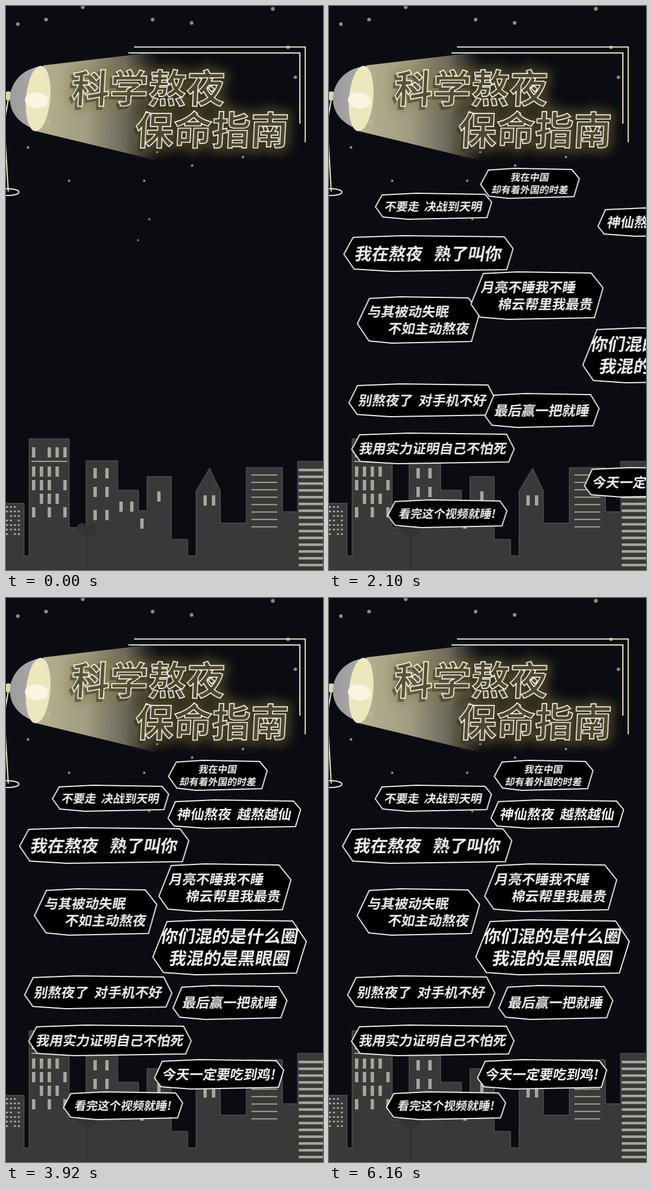
Recreate the animation shown at these times as an HTML page. Size 562 px wide and 997 px high, loop 6300 ms.

```html
<!DOCTYPE html>
<html lang="zh">
<head>
<meta charset="utf-8">
<style>
html, body { margin: 0; width: 100%; height: 100%; overflow: hidden; background: #0b0c12; }
svg { display: block; width: 100%; height: 100%; }
text { font-family: "Noto Sans CJK SC", "Noto Sans CJK", sans-serif; font-weight: 700; white-space: pre; }
.title { font-size: 68px; }
.pill polygon { fill: #000; stroke: #f0f0f0; stroke-width: 2; }
.pill text { fill: #eee; text-anchor: middle; }
</style>
</head>
<body>
<svg id="stage" viewBox="0 0 562 997">
  <defs>
    <linearGradient id="beam" gradientUnits="userSpaceOnUse" x1="60" y1="0" x2="272" y2="0">
      <stop offset="0" stop-color="#b7b18f"/>
      <stop offset=".4" stop-color="#a8a388" stop-opacity=".95"/>
      <stop offset=".72" stop-color="#8f8b75" stop-opacity=".72"/>
      <stop offset="1" stop-color="#6d6a5c" stop-opacity="0"/>
    </linearGradient>
    <linearGradient id="shade" x1="0" x2="1">
      <stop offset="0" stop-color="#9b9b9d"/><stop offset="1" stop-color="#acacac"/>
    </linearGradient>
    <filter id="glow" x="-20%" y="-40%" width="140%" height="180%"><feGaussianBlur stdDeviation="9"/></filter>
    <g id="title" class="title">
      <text transform="translate(115 171) skewX(-3)">科学熬夜</text>
      <text transform="translate(228 245) skewX(-3)">保命指南</text>
    </g>
  </defs>
  <rect width="562" height="997" fill="#0b0c12"/>
  <g id="stars" fill="#918b6c"></g>

  <path d="M0 879H32V972H41V765H112V922H142V804H198V856H235V892H250V832H293V943H322V972H337V857L361 817L380 857V914H426V816H490V894H517V805H563V998H-1V879Z" fill="#393939" stroke="#626262"/>
  <g fill="#333">
    <circle cx="134" cy="923" r="9"/>
    <path d="M145 940C128 931 131 917 139 917Q144 917 146 922Q151 913 158 917C167 922 162 932 145 940Z"/>
    <rect x="143" y="930" width="4" height="67"/>
  </g>
  <g id="windows" fill="#a5a59a"></g>

  <path d="M66 105L245 84H272V274L52 221Z" fill="url(#beam)"/>
  <g fill="none" stroke="#f3f0c6" stroke-width="2">
    <path d="M4 165L-3 206L4 328"/>
    <ellipse cx="4" cy="329" rx="19" ry="6"/>
    <path d="M227 72.5H530.5V241M217 83H521V208"/>
  </g>
  <circle cx="4" cy="159" r="8" fill="#dad5ac"/>
  <path d="M62 107C30 110 7 135 7 164C7 190 25 209 52 218Z" fill="url(#shade)"/>
  <ellipse cx="57" cy="163.500" rx="21.500" ry="58" transform="rotate(5 57 163)" fill="#ece7bd"/>
  <ellipse cx="54" cy="167" rx="20.500" ry="14" transform="rotate(5 54 167)" fill="#f8f6e1"/>
  <circle cx="75" cy="205" r="1.800" fill="#d2ccaa"/>

  <use href="#title" fill="#857838" stroke="#857838" stroke-width="18" stroke-linejoin="round" filter="url(#glow)" opacity=".45"/>
  <use href="#title" x="-4" y="5" fill="#302c1c" stroke="#302c1c" stroke-width="3" opacity=".5"/>
  <use href="#title" fill="#564e2a" fill-opacity=".75" stroke="#fff" stroke-width="1.700"/>
</svg>
<script>
const LOOP = 6300, STEP = 70, REST = 6090;
const SPEED = 0.463, BOUNCE = 250;
const stage = document.getElementById('stage');

function add(parent, tag, attrs, text) {
  const node = document.createElementNS('http://www.w3.org/2000/svg', tag);
  for (const key in attrs) node.setAttribute(key, attrs[key]);
  if (text) node.textContent = text;
  return parent.appendChild(node);
}

const repeat = (count, draw) => { for (let i = 0; i < count; i++) draw(i); };

// stars get smaller towards the horizon
const stars = document.getElementById('stars');
for (const [cx, cy] of [[21, 32], [71, 24], [136, 2], [260, 24], [329, 30], [473, 5], [500, 73], [513, 126],
  [268, 258], [330, 282], [420, 267], [112, 309], [245, 309], [39, 250], [254, 377], [234, 414]])
  add(stars, 'circle', { cx, cy, r: 3.4 - cy / 250 });

const windows = document.getElementById('windows');
const pane = (x, y, width, height) => add(windows, 'rect', { x, y, width, height });
const row = (y, ...centers) => centers.forEach(c => pane(c - 3, y, 6, 18));

['# ###', '#### ', '### #', ' ### ', '# # #'].forEach((mask, j) =>
  [...mask].forEach((mark, i) => { if (mark === '#') row(j ? 790 + j * 24 : 780, 49 + i * 13.9); }));
pane(45, 804, 64, 2);
for (const y of [817, 850, 891]) row(y, 158, 179);
row(876, 204, 223);
row(906, 241);
row(858, 271);
row(865, 353, 368);
repeat(8, i => pane(435, 828 + i * 13.1, 46, 2));
repeat(15, i => pane(519, 818 + i * 12, 43, 4.5));
repeat(7, i => repeat(4, j => { if ((i * 3 + j * 2) % 7 !== 6) pane(j * 7, 884 + i * 8, 3.5, 3); }));

// zero: moment a group first reaches its place; from: side it enters on
// pill: box [x, y, width, height], font size, lines, stagger between the lines
const groups = [
  {
    from: -1, zero: 1317, rest: 2, sway: 3, period: 440,
    pills: [
      { box: [83, 331, 206, 46], size: 20.5, lines: ['不要走  决战到天明'] },
      { box: [51, 514, 217, 82], size: 24, lines: ['与其被动失眠', '不如主动熬夜'], stagger: 36 },
      { box: [41, 755, 288, 54], size: 23.8, lines: ['我用实力证明自己不怕死'] }
    ]
  },
  {
    from: -1, zero: 1855, rest: -0.5, sway: 0.5, period: 440,
    pills: [
      { box: [25, 406, 300, 63], size: 30, lines: ['我在熬夜   熟了叫你'] },
      { box: [34, 668, 261, 58], size: 24, lines: ['别熬夜了  对手机不好'] },
      { box: [103, 873, 211, 49], size: 20.5, lines: ['看完这个视频就睡!'] }
    ]
  },
  {
    from: 1, zero: 1996, rest: 1, sway: 3, period: 385,
    pills: [
      { box: [289, 287, 175, 53], size: 17, lines: ['我在中国', '却有着外国的时差'] },
      { box: [272, 470, 234, 84], size: 24, lines: ['月亮不睡我不睡', '棉云帮里我最贵'], stagger: 30 },
      { box: [297, 685, 202, 60], size: 24, lines: ['最后赢一把就睡'] }
    ]
  },
  {
    from: 1, zero: 2506, rest: -1, sway: 0.8, period: 440,
    pills: [
      { box: [289, 357, 235, 50], size: 24, lines: ['神仙熬夜  越熬越仙'] },
      { box: [262, 569, 272, 97], size: 30.5, lines: ['你们混的是什么圈', '我混的是黑眼圈'] },
      { box: [265, 816, 229, 52], size: 24, lines: ['今天一定要吃到鸡!'] }
    ]
  }
];

// slide in at even speed, overshoot once, then sway until the end
function offsetAt({ from, zero, rest, sway, period }, time) {
  const age = time - zero;
  if (age < 0) return -from * SPEED * Math.max(age, -750);
  if (age < BOUNCE) return -from * 21 * Math.sin(Math.PI * age / BOUNCE);
  return rest + sway * Math.cos(2 * Math.PI * (Math.min(time, REST) - 4550) / period);
}

// a slab with cut corners, pointed on the left and right
function outline(x, y, w, h) {
  const left = 0.6 + 0.08 * Math.sin(w), right = 0.43 + 0.1 * Math.sin(y);
  return [
    [0, left * h], [0.26 * h, 3], [0.35 * w, 0], [w - 0.25 * h, 2],
    [w, right * h], [w - 0.18 * h, h - 3], [0.28 * w, h], [(1 - left) * 0.6 * h, h - 4]
  ].map(([dx, dy]) => [x + dx, y + dy]).join(' ');
}

function drawPill(group, { box, size, lines, stagger = 0 }) {
  const [x, y, w, h] = box;
  add(group, 'polygon', { points: outline(...box) });
  lines.forEach((line, i) => {
    const k = i - (lines.length - 1) / 2;
    const cx = x + w / 2 + k * stagger - size * 0.06;
    const baseline = y + h / 2 + k * size * 1.28 + size * 0.37;
    add(group, 'text', { 'font-size': size, transform: `translate(${cx} ${baseline}) skewX(-10)` }, line);
  });
}

for (const motion of groups) {
  const group = add(stage, 'g', { class: 'pill' });
  motion.pills.forEach(pill => drawPill(group, pill));
  const frames = [];
  for (let time = 0; time <= LOOP; time += STEP)
    frames.push({
      offset: time / LOOP,
      easing: 'step-end',
      transform: `translateX(${offsetAt(motion, time).toFixed(2)}px)`
    });
  group.animate(frames, { duration: LOOP, iterations: Infinity });
}
</script>
</body>
</html>
```
